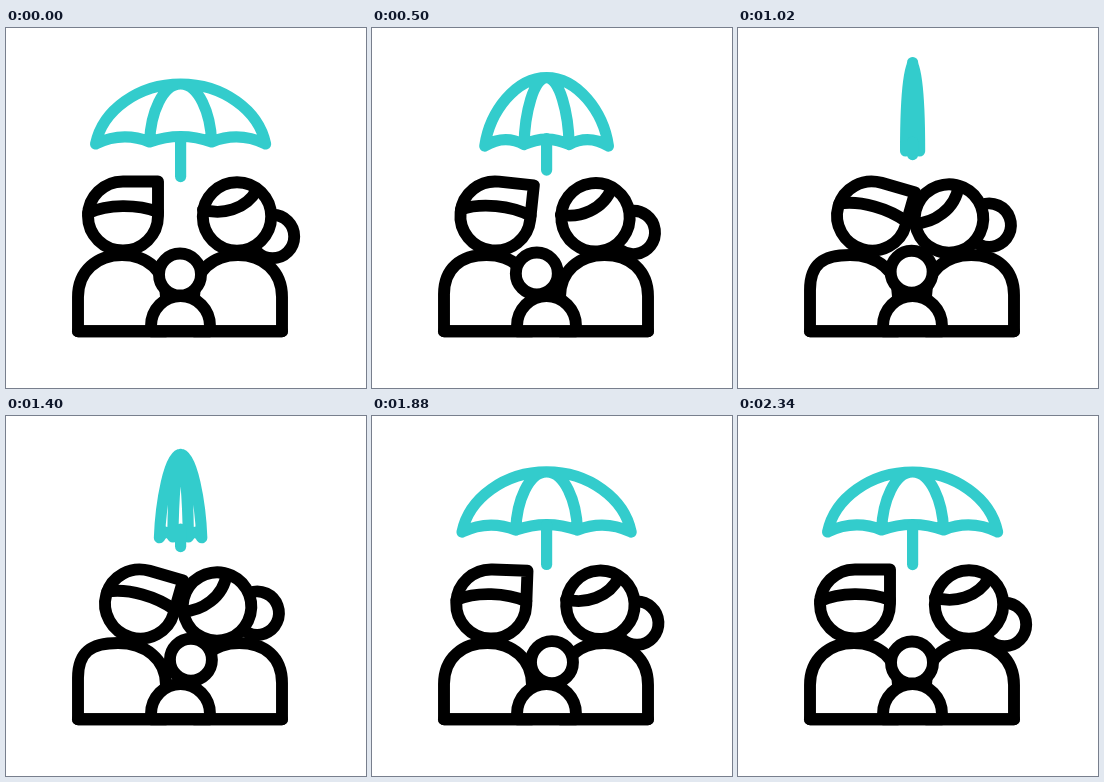
Animation of 360 by 360 pixels, one loop 2.4 s. Source, as an HTML page:

```html
<!DOCTYPE html>
<html lang="en">
<head>
<meta charset="utf-8">
<title>Family under an umbrella</title>
<style>
html, body { margin: 0; width: 100%; height: 100%; overflow: hidden; background: #fff; }
svg { display: block; width: 100%; height: 100%; }
</style>
</head>
<body>
<svg viewBox="0 0 360 360" stroke-linecap="round" stroke-linejoin="round">
  <g fill="none" stroke="#33cccc" stroke-width="11.2">
    <path id="canopy"/>
    <path id="stem"/>
  </g>
  <g fill="#fff" stroke="#000" stroke-width="11.9">
    <path id="dadBody"/>
    <path id="mumBody"/>
    <g id="dad">
      <path d="M152 153.5H117A35 34.5 0 0 0 82 188A35 34.5 0 0 0 152 188Z"/>
      <path fill="none" d="M82 185C102 176 131 176 152 184"/>
    </g>
    <g id="mum">
      <circle cx="266.5" cy="208.5" r="21.7"/>
      <circle cx="231" cy="188.5" r="34.2"/>
      <path fill="none" d="M197 181.5C215 187.5 240 182 251 161.5"/>
    </g>
    <circle id="kid" r="21"/>
    <path d="M145 303.2V298A29.5 30 0 0 1 204 298V303.2Z"/>
    <path d="M72 303.2H276"/>
  </g>
</svg>
<script>
const LOOP = 2400, CX = 174.6;
const $ = id => document.getElementById(id);
const mix = (a, b, k) => a + (b - a) * k;

// Symmetric ease in and out of the given power between two times
function ease(t, from, to, power) {
  const x = Math.min(1, Math.max(0, (t - from) / (to - from)));
  const half = v => Math.pow(2 * v, power) / 2;
  return x < 0.5 ? half(x) : 1 - half(1 - x);
}

// Umbrella: k = 0 open, k = 1 folded
function umbrella(k) {
  const pt = (side, w0, w1, y0, y1) =>
    (CX + side * mix(w0, w1, k)).toFixed(2) + ' ' + mix(y0, y1, k).toFixed(2) + ' ';
  const top = pt(0, 0, 0, 56, 34.5);
  const tip = s => pt(s, 85, 7, 116, 123);
  const foot = s => pt(s, 31, 2.5, 114, 122.5);
  const side = s =>
    'M' + tip(s) + 'C' + pt(s, 78, 7, 82, 88) + pt(s, 42, 4.5, 56, 34.5) + top +
    'M' + foot(s) + 'C' + pt(s, 30, 2.5, 85, 85) + pt(s, 18, 1, 56, 34.5) + top +
    'M' + tip(s) + 'Q' + pt(s, 58, 5, 103, 113) + foot(s);
  $('canopy').setAttribute('d', side(-1) + side(1) +
    'M' + foot(-1) + 'Q' + pt(0, 0, 0, 103, 113) + foot(1));
  $('stem').setAttribute('d', 'M' + pt(0, 0, 0, 109, 114) + 'L' + pt(0, 0, 0, 148.6, 126.6));
}

// Torso from its outer edge inwards; lift squares up the outer shoulder
function torso(id, x, dir, lift) {
  const px = d => x + dir * d;
  $(id).setAttribute('d',
    `M${px(0)} 303.2V${269 - 7 * lift}C${px(0)} ${243 - 7 * lift} ${px(19 - 6 * lift)} 227 ` +
    `${px(44 - 4 * lift)} 227S${px(88)} 243 ${px(88)} 269V303.2Z`);
}

function draw(t) {
  umbrella(ease(t, 110, 1040, 3) - ease(t, 1080, 1980, 3));

  const lean = ease(t, 60, 1030, 3) - ease(t, 1310, 2200, 4);
  $('dad').setAttribute('transform', `translate(${17 * lean} 0) rotate(${16 * lean} 117 188)`);
  $('mum').setAttribute('transform', `translate(${-20 * lean} ${2 * lean}) rotate(${-20 * lean} 231 188.5)`);
  torso('dadBody', 72, 1, lean);
  torso('mumBody', 276, -1, 0.3 * lean);

  const sway = -9.5 * ease(t, 110, 560, 2) + 21.5 * ease(t, 560, 1560, 2) - 12 * ease(t, 1560, 2200, 2);
  $('kid').setAttribute('cx', 174 + sway);
  $('kid').setAttribute('cy', 246.5 - 2.8 * lean);
}

function tick() {
  draw(performance.now() % LOOP);
  requestAnimationFrame(tick);
}
tick();
</script>
</body>
</html>
```
